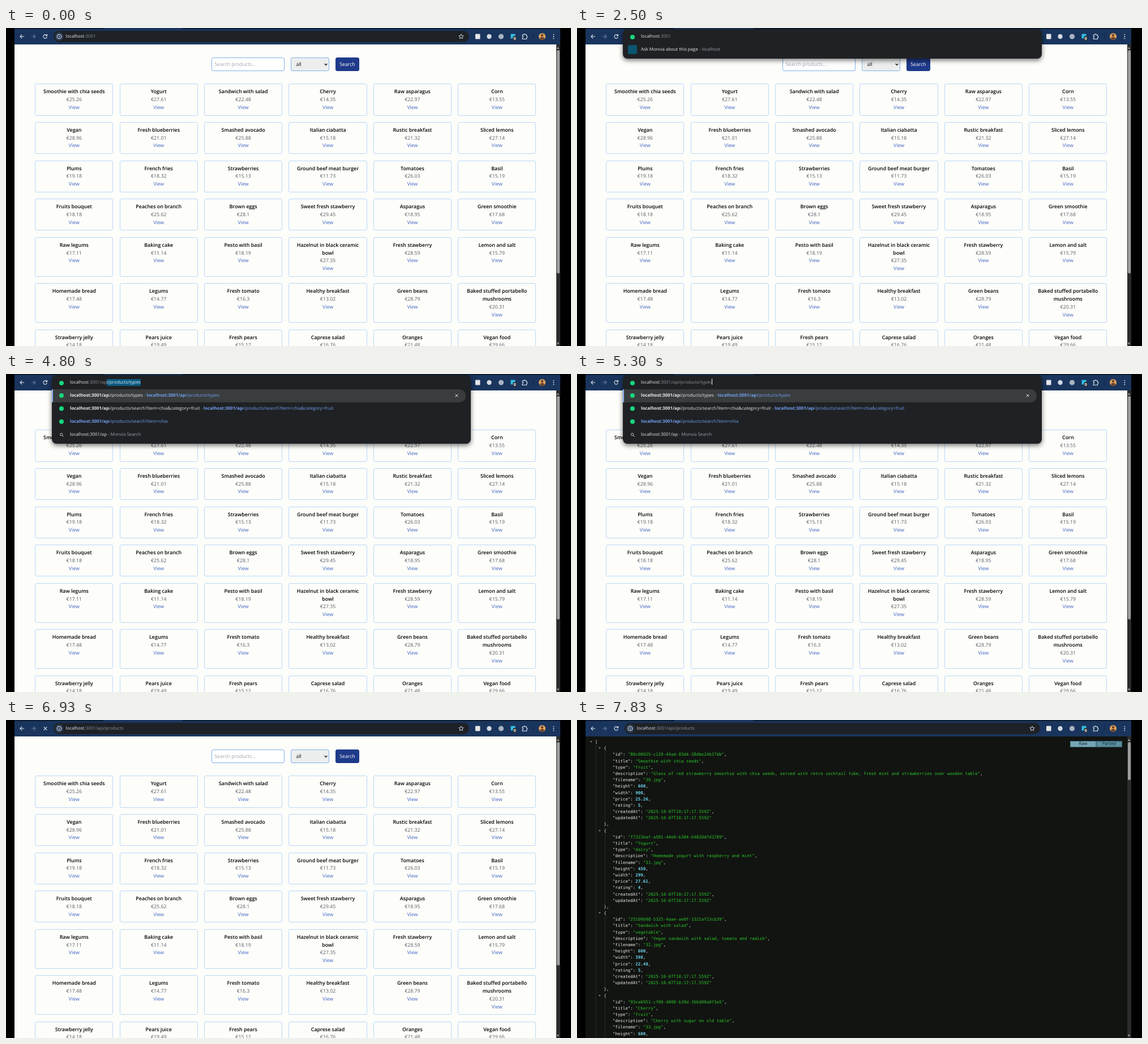
These frames come from a looping animation (998 by 561 pixels, 8 s). An HTML page:

```html
<!DOCTYPE html>
<html lang="en">
<head>
<meta charset="utf-8">
<title>Products API</title>
<style>
  html, body { margin: 0; width: 100%; height: 100%; overflow: hidden; background: #000; }
  #stage { position: relative; width: 998px; height: 561px; overflow: hidden; background: #000;
    font: 8.75px/13.75px "Open Sans", "Noto Sans", sans-serif; text-rendering: geometricPrecision; }
  #stage div, #stage svg { box-sizing: border-box; }
  .abs, .view, .bar, #pill, #drop { position: absolute; }

  .bar { left: 15px; top: 0; width: 964px; height: 28.5px; background: #1a355d; }
  .tabs { left: 0; top: 0; width: 964px; height: 2px;
    background: linear-gradient(90deg, #0b1c30 157px, #1a355d 157px 297px, #0b1c30 297px); }
  #icons { left: 0; top: 0; }
  .url { font-size: 7.85px; line-height: 20px; white-space: pre; color: #8d9498; }
  .url b, .row b { font-weight: 400; color: #e8eaed; }
  #pill { left: 84px; top: 5px; width: 734px; height: 20px; border-radius: 10px;
    background: #1e2226; padding-left: 21.5px; }
  #pill.focus { box-shadow: 0 0 0 1.3px #bcd3f2; }
  .caret { display: inline-block; width: 1px; height: 11px; margin-right: -1px; background: #e8eaed; vertical-align: -2px; }
  .sel { background: #0b5b80; color: #dbeaf5; padding: 1px 0; }
  .sel b { color: #fff; }

  #drop { left: 81px; top: 2px; width: 740px; padding: 3px 0 4.5px; border-radius: 8px; background: #1f2124;
    box-shadow: 0 3px 9px rgba(0,0,0,.55); overflow: hidden; }
  #drop .url { height: 21.5px; padding-left: 32px; position: relative; }
  .row { position: relative; height: 23px; padding-left: 32px; font-size: 7.85px; line-height: 23px;
    white-space: pre; color: #9aa0a6; }
  .row i { font-style: normal; color: #739ff0; }
  .row strong { font-weight: 700; }
  .row.on { width: 731px; background: #393d3d; border-radius: 0 12px 12px 0; box-shadow: inset 2px 0 #86abee; }
  .dot { position: absolute; left: 13px; top: 50%; width: 8px; height: 8px; margin-top: -4px; border-radius: 50%; background: #16d67d; }
  .tile { position: absolute; left: 9px; top: 3.5px; width: 16px; height: 16px; border-radius: 3px; background: #0b5670; }
  .row svg { position: absolute; left: 13px; top: 7.5px; }
  .row .x { left: 711px; }

  .view { left: 15px; top: 28.5px; width: 964px; height: 533px; overflow: hidden; }
  #shop { background: #fdfdfa; color: #111; }
  .field { top: 23px; height: 24.5px; line-height: 22.5px; border: 1px solid #80b1ec; border-radius: 3px; }
  .grid { left: 36.3px; top: 69.8px; width: 885px; display: grid; grid-template-columns: repeat(6, 1fr); gap: 11.4px; }
  .card { border: 1px solid #b9d9f9; border-radius: 3px; padding: 7px 6.5px 6px; text-align: center; color: #5a5e65; }
  .card strong { font-size: 8.87px; font-weight: 600; color: #000; display: block; }
  .card u { text-decoration: none; color: #4064c4; display: block; }
  .track { right: 0; top: 0; width: 7.5px; height: 533px; background: #2b2c2c; }
  .track::before, .track::after { content: ""; position: absolute; left: 1.5px; border: 2.3px solid transparent; }
  .track::before { top: 2px; border-bottom: 4px solid #a0a0a0; }
  .track::after { bottom: 1px; border-top: 4px solid #a0a0a0; }
  .thumb { left: 1.5px; top: 10.5px; width: 5px; border-radius: 3px; background: #9d9e9e; }

  .dark { background: #121411; color: #e9e9e9; font: 7.45px/11.18px "DejaVu Sans Mono", "Liberation Mono", monospace; }
  .pretty { left: 0; top: 0; width: 964px; height: 12px; background: #3b3b3b; border-bottom: 1px solid #a5a5a5; color: #fff; }
  .check { left: 57px; top: 2px; width: 7px; height: 7px; border: 1px solid #8b8b8b; border-radius: 1px; }
  .tree { left: 17px; top: 4.5px; white-space: pre; }
  .in { margin-left: 1px; border-left: 1px dotted #3c403b; padding-left: 13.5px; }
  .open { position: relative; }
  .open::before { content: ""; position: absolute; left: -9.5px; top: 4.2px; border: 2.7px solid transparent; border-top: 3.5px solid #777; border-bottom: 0; }
  .str { color: #2cc42c; }
  .num { color: #6ed3ee; font-weight: 700; }
  .btn { top: 8px; width: 46px; height: 11.5px; background: #76a6b6; border: 1px solid #4b7482; color: #10212a;
    font: 7.6px/9.5px "Open Sans", sans-serif; text-align: center; }
  .btn.on { background: #5c93a5; box-shadow: inset 0 0 2px #1c3d4a; }
</style>
</head>
<body>
<div id="stage">
  <div class="view" id="shop">
    <div class="abs field" style="left:348px;width:129px;background:#fff;color:#a0a6b0;padding-left:4.5px">Search products...</div>
    <div class="abs field" style="left:488px;width:68px;background:#eceeee;padding-left:8.5px">all
      <svg class="abs" style="right:2px;top:9px" width="6" height="5"><path d="M.7 1 3 3.5 5.3 1" fill="none" stroke="#111" stroke-width="1.2"/></svg>
    </div>
    <div class="abs field" style="left:567px;width:42px;background:#1f3a8a;border-color:#1f3a8a;color:#fff;text-align:center">Search</div>
    <div class="abs grid" id="grid"></div>
    <div class="abs track"><div class="abs thumb" style="height:394px"></div></div>
  </div>
  <div class="view dark" id="raw"><div class="abs pretty">Pretty-print<div class="abs check"></div></div></div>
  <div class="view dark" id="json">
    <div class="abs tree" id="tree"></div>
    <div class="abs btn" style="left:856px">Raw</div>
    <div class="abs btn on" style="left:902px">Parsed</div>
    <div class="abs track"><div class="abs thumb" style="height:67px"></div></div>
  </div>
  <div class="bar"><div class="abs tabs"></div></div>
  <div id="pill" class="url"></div>
  <svg id="icons" class="abs" width="998" height="29" fill="none" stroke="#dfe5ee" stroke-width="1.1">
    <path d="M32 15h-7m3.2-3.3L25 15l3.2 3.3"/>
    <path d="M45 15h7m-3.2-3.3L52 15l-3.2 3.3" stroke="#6c7f9a"/>
    <path id="reload" d="M72 13a3.3 3.3 0 1 0 .4 3M72.6 11v2.6H70"/>
    <path id="stop" d="m66.7 12.2 5.6 5.6m0-5.6-5.6 5.6"/>
    <g id="info"><circle cx="94" cy="15" r="7.5" fill="#2b3b52" stroke="none"/><circle cx="94" cy="15" r="3.8"/><path d="M94 14.4v2.6m0-4.3v1"/></g>
    <path id="star" d="m804 10.8 1.2 2.8 3 .2-2.3 2 .7 3-2.6-1.6-2.6 1.6.7-3-2.3-2 3-.2z" stroke-width=".9"/>
    <rect x="829" y="10.5" width="8.5" height="9" rx="1" fill="#e4e6e8" stroke="none"/>
    <circle cx="853.5" cy="15" r="4.2" fill="#d4dae2" stroke="none"/>
    <circle cx="874.5" cy="15" r="4.6" fill="#aab4c1" stroke="none"/>
    <rect x="891.5" y="10.5" width="8" height="8" rx="1" fill="#35bde0" stroke="none"/>
    <rect x="895.5" y="14" width="6.5" height="8.5" rx="2" fill="#2a2d30" stroke="none"/>
    <text x="898.8" y="21" font-size="7" font-weight="700" text-anchor="middle" fill="#fff" stroke="none">0</text>
    <path d="M912.2 12h2.3a1.4 1.4 0 0 1 2.8 0h2.2v2.4a1.4 1.4 0 0 1 0 2.8v2.3h-7.3v-2.3a1.4 1.4 0 0 0 0-2.8z"/>
    <path d="M931.5 10v10" stroke="#0f2646"/>
    <circle cx="947" cy="15" r="6" fill="#e0a45f" stroke="none"/>
    <path d="M943 19.3a4 3.6 0 0 1 8 0 6 6 0 0 1-8 0zM947 10.5a2.3 2.3 0 1 1-.01 0z" fill="#6b432c" stroke="none"/>
    <g fill="#dfe5ee" stroke="none"><circle cx="967.3" cy="11.6" r=".95"/><circle cx="967.3" cy="15" r=".95"/><circle cx="967.3" cy="18.4" r=".95"/></g>
  </svg>
  <div id="drop"></div>
</div>
<script>
const $ = id => document.getElementById(id);

const products = `Smoothie with chia seeds 25.26|Yogurt 27.61|Sandwich with salad 22.48|Cherry 14.35|Raw asparagus 22.97|Corn 13.55
Vegan 28.96|Fresh blueberries 21.01|Smashed avocado 25.88|Italian ciabatta 15.18|Rustic breakfast 21.32|Sliced lemons 27.14
Plums 19.18|French fries 18.32|Strawberries 15.13|Ground beef meat burger 11.73|Tomatoes 26.03|Basil 15.19
Fruits bouquet 18.18|Peaches on branch 25.62|Brown eggs 28.1|Sweet fresh stawberry 29.45|Asparagus 18.95|Green smoothie 17.68
Raw legums 17.11|Baking cake 11.14|Pesto with basil 18.19|Hazelnut in black ceramic bowl 27.35|Fresh stawberry 28.59|Lemon and salt 15.79
Homemade bread 17.48|Legums 14.77|Fresh tomato 16.3|Healthy breakfast 13.02|Green beans 28.79|Baked stuffed portabello mushrooms 20.31
Strawberry jelly 14.18|Pears juice 19.49|Fresh pears 15.12|Caprese salad 16.76|Oranges 21.48|Vegan food 29.66`;
$('grid').innerHTML = products.split(/[|\n]/).map(p =>
  p.replace(/(.*) (.*)/, '<div class="card"><strong>$1</strong>€$2<u>View</u></div>')).join('');

const stamp = '2025-10-07T10:17:17.559Z';
const keys = ['id', 'title', 'type', 'description', 'filename', 'height', 'width', 'price', 'rating', 'createdAt', 'updatedAt'];
const records = [
  ['80c00925-c120-44ad-83d4-38dbe24b17db', 'Smoothie with chia seeds', 'fruit', 'Glass of red strawberry smoothie with chia seeds, served with retro cocktail tube, fresh mint and strawberries over wooden table', '30.jpg', 600, 900, 25.26, 5],
  ['f7323eaf-a581-44e0-b384-64820dfd1789', 'Yogurt', 'dairy', 'Homemade yogurt with raspberry and mint', '31.jpg', 450, 299, 27.61, 4],
  ['25109b98-5325-4aae-ae0f-1321af13cb39', 'Sandwich with salad', 'vegetable', 'Vegan sandwich with salad, tomato and radish', '32.jpg', 600, 398, 22.48, 5],
  ['93ca6951-cf00-4008-b39d-366d00a0f3a5', 'Cherry', 'fruit', 'Cherry with sugar on old table', '33.jpg', 600, 400, 14.35, 4]
];
const value = v => typeof v === 'number' ? `<span class="num">${v}</span>` : `<span class="str">"${v}"</span>`;
const record = r => '<div class="open">{</div><div class="in">' +
  [...r, stamp, stamp].map((v, i) => `<div>"${keys[i]}": ${value(v)}${i < 10 ? ',' : ''}</div>`).join('') + '</div><div>},</div>';
$('tree').innerHTML = `<div class="open">[</div><div class="in">${records.map(record).join('')}</div>`;

const host = 'localhost:3001';
const visited = ['/api/products/types', '/api/products/search?item=chia&category=fruit', '/api/products/search?item=chia'];
const engine = 'Monvia';
const dot = '<span class="dot"></span>';
const lens = '<svg width="9" height="9" fill="none" stroke="#c4c7cb"><circle cx="3.6" cy="3.6" r="2.2"/><path d="m5.3 5.3 2.5 2.5"/></svg>';
const cross = '<svg class="x" width="9" height="9" stroke="#e0e2e5"><path d="m1.5 1.5 5 5m0-5-5 5"/></svg>';

const address = path => `<b>localhost</b>:3001${path}`;
const caretMark = on => on ? '<span class="caret"></span>' : '';

function suggestions(path, completed) {
  const typed = host + path;
  const match = url => `<strong>${typed}</strong>${url.slice(path.length).replace('&', '&amp;')}`;
  const rows = visited.filter(url => url.startsWith(path)).map(url =>
    dot + (url === visited[2] ? '' : `<b>${match(url)}</b> - `) + `<i>${match(url)}</i>`);
  if (!completed && !visited.includes(path)) rows.unshift(`${dot}<i><strong>${typed}</strong></i>`);
  rows[0] += cross;
  rows.push(`${lens}<b>${typed}</b> - ${engine} Search`);
  return rows.map((r, i) => `<div class="row${i ? '' : ' on'}">${r}</div>`).join('');
}

// `path` is what stands in the bar, `query` what the list was made for.
function dropdown({ path = '', query = path, completed, caret, selected }) {
  const rest = completed ? `<span class="sel">${visited[0].slice(path.length)}</span>` : '';
  const text = selected ? `<span class="sel">${address('')}</span>` : address(path) + rest + caretMark(caret);
  const list = path ? suggestions(query, completed || query !== path)
    : `<div class="row"><span class="tile"></span><b>Ask ${engine} about this page</b> - localhost</div>`;
  return `<div class="url">${dot}${text}</div>${list}`;
}

// The completed path is accepted, then "types" and the slash are erased key by key.
const erasing = Array.from({ length: 6 }, (_, i) =>
  [5370 + 140 * i, { open: true, path: visited[0].slice(0, -1 - i), caret: true }]);

const steps = [
  [0, {}],
  [1100, { focus: true, caret: true }],
  [1170, { open: true, selected: true }],
  [2030, { open: true, caret: true }],
  [2500, { open: true }],
  [2700, { open: true, path: '/', caret: true }],
  [3200, { open: true, path: '/' }],
  [3700, { open: true, path: '/', caret: true }],
  [4000, { open: true, path: '/a', completed: true }],
  [4800, { open: true, path: '/ap', completed: true }],
  [5230, { open: true, path: visited[0], query: '/ap', caret: true }],
  ...erasing,
  [6530, { open: true, path: '/api/products' }],
  [6930, { path: '/api/products', loading: true }],
  [6970, { page: 'raw', path: '/api/products', loading: true }],
  [7100, { page: 'json', path: '/api/products' }]
];

const show = (id, on) => { $(id).style.display = on ? '' : 'none'; };

function render(s) {
  const page = s.page || 'shop';
  ['shop', 'raw', 'json'].forEach(id => show(id, id === page));
  show('stop', s.loading);
  show('reload', !s.loading);
  ['pill', 'info', 'star'].forEach(id => show(id, !s.open));
  show('drop', s.open);
  $('pill').classList.toggle('focus', !!s.focus);
  if (s.open) $('drop').innerHTML = dropdown(s);
  else $('pill').innerHTML = address(s.path || '') + caretMark(s.caret);
}

let current;
function tick() {
  const t = performance.now() % 8000;
  const step = steps.filter(([start]) => start <= t).pop();
  if (step !== current) render((current = step)[1]);
  requestAnimationFrame(tick);
}
tick();
</script>
</body>
</html>
```
